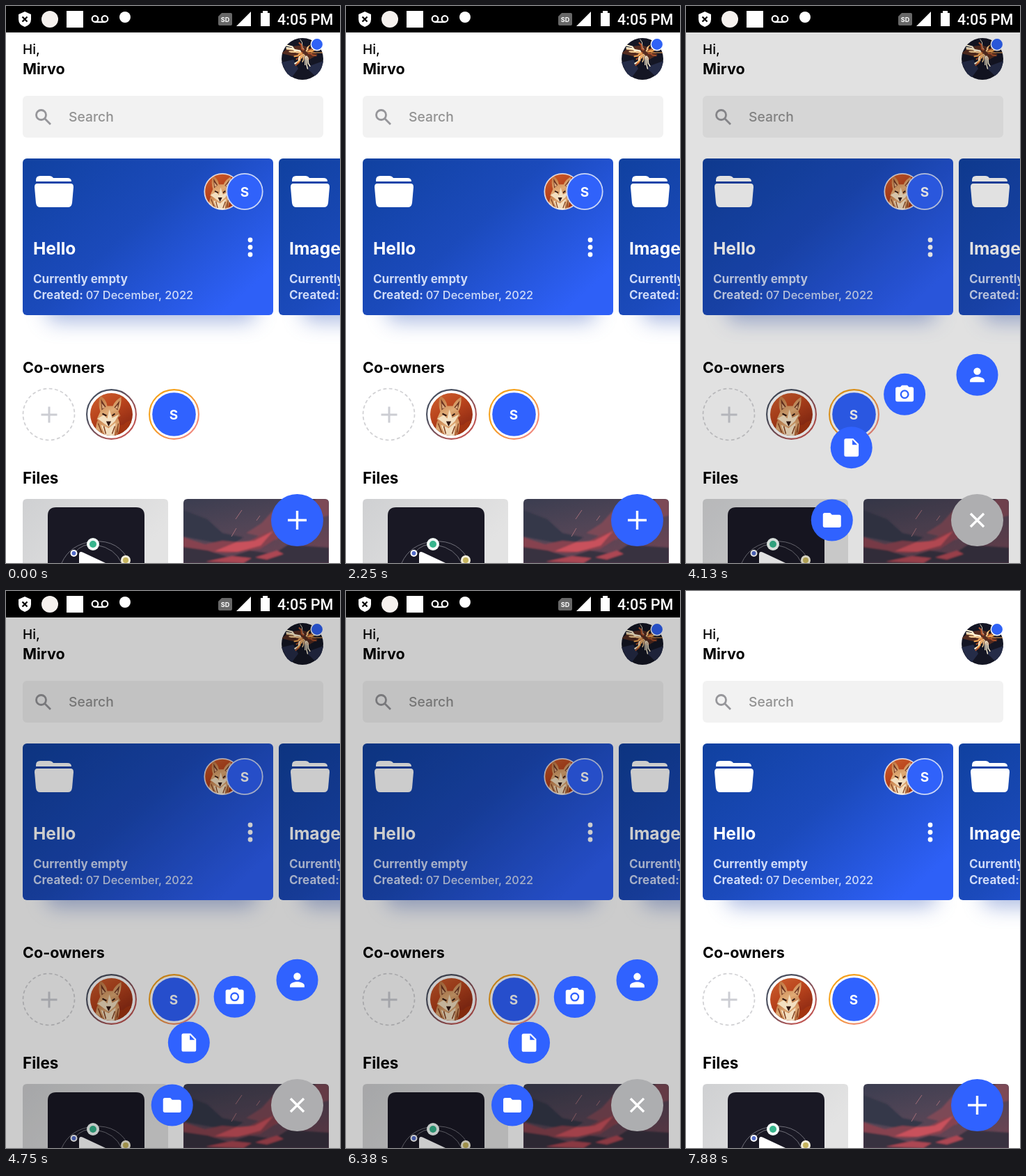
An HTML page that plays this animation: 480x800 px, repeating every 8 s.

```html
<!DOCTYPE html>
<html lang="en">
<head>
<meta charset="utf-8">
<title>File manager home</title>
<style>
  html, body { margin: 0; width: 100%; height: 100%; overflow: hidden; background: #fff; }
  svg { display: block; width: 480px; height: 800px; }
  text { font-family: Inter, sans-serif; font-weight: 700; }
  .regular { font-weight: 500; }
  .initial { font-size: 19px; fill: #fff; text-anchor: middle; }
  .stroke { fill: none; stroke: #fff; }
</style>
</head>
<body>
<svg viewBox="0 0 480 800">
  <defs>
    <linearGradient id="cardBlue" x2="1" y2=".7">
      <stop stop-color="#1041a0"/><stop offset=".5" stop-color="#1b4abb"/><stop offset="1" stop-color="#2e60f7"/>
    </linearGradient>
    <linearGradient id="foxRing" x2="1" y2="1"><stop offset=".3" stop-color="#4a5060"/><stop offset=".8" stop-color="#bd5552"/></linearGradient>
    <linearGradient id="goldRing" x2="1" y2="1"><stop offset=".4" stop-color="#f5a11c"/><stop offset=".85" stop-color="#f28b7c"/></linearGradient>
    <linearGradient id="rust" x2=".6" y2="1"><stop stop-color="#cf6230"/><stop offset=".5" stop-color="#b8431c"/><stop offset="1" stop-color="#8a2813"/></linearGradient>
    <linearGradient id="fur" x2=".3" y2="1"><stop stop-color="#bd6f3a"/><stop offset=".6" stop-color="#e0ab76"/><stop offset="1" stop-color="#b56a3a"/></linearGradient>
    <linearGradient id="paper" x2="1" y2=".4"><stop stop-color="#cfd0d2"/><stop offset="1" stop-color="#e3e3e3"/></linearGradient>
    <linearGradient id="sky" x2=".5" y2="1"><stop stop-color="#3b3d50"/><stop offset=".5" stop-color="#514556"/><stop offset="1" stop-color="#6a4453"/></linearGradient>
    <filter id="soft" x="-30%" y="-100%" width="160%" height="300%"><feGaussianBlur stdDeviation="15"/></filter>
    <filter id="haze"><feGaussianBlur stdDeviation="1.2"/></filter>
    <clipPath id="disc"><circle r="30.5"/></clipPath>
    <clipPath id="photo"><path d="M255 800V714q0-6 6-6h197q6 0 6 6v86z"/></clipPath>

    <g id="fox" clip-path="url(#disc)">
      <circle r="31" fill="url(#rust)"/>
      <path d="M5 31Q7 14 17 15 23 8 31 9V31z" fill="#a33512"/>
      <path d="M-21 31Q-25 14-17 4H9Q15 17 8 31z" fill="url(#fur)"/>
      <path d="M-16-27Q-7-21-6-12L2-12Q5-20 14-25 15-13 10-4L13 2 4 9-4 19-11 12-21 7-16-4Q-20-16-16-27z" fill="url(#fur)"/>
      <path d="M-15-22-8-11-14-6zM12-20 4-10 9-6z" fill="#6a3320"/>
      <path d="M-14-16-9-10-13-8zM9-14 5-9 9-8z" fill="#dba97d"/>
      <path d="M-20 6-11 1-6 6-3-7 1 5 11 0 5 10-4 18-12 12zM-15 15-4 20 6 12 4 31H-9z" fill="#f3dfc0"/>
      <path d="M-13-1l6 3M5-1 1 2M-6 11h4l-2 4z" stroke="#301812" stroke-width="2"/>
      <path d="M-19 13l5 13M-11 17l3 11M5 17 1 28M10 13 8 26" fill="none" stroke="#82401f" stroke-width="1.500"/>
    </g>

    <g id="card">
      <rect x="35" y="180" width="300" height="54" rx="10" fill="#5775c4" opacity=".5" filter="url(#soft)"/>
      <rect width="360" height="225" rx="6" fill="url(#cardBlue)"/>
      <g fill="#fff">
        <path d="M19 33v-2q0-6 6-6h13q4 0 6 3h20q6 0 6 5z"/>
        <path d="M21 36h48q4 0 4 5l-2 23q-1 6-6 6H25q-5 0-6-6L17 41q0-5 4-5z"/>
        <circle cx="327" cy="117" r="3.4"/><circle cx="327" cy="127.500" r="3.4"/><circle cx="327" cy="138" r="3.4"/>
      </g>
      <use href="#fox" transform="translate(287 47.500) scale(.85)"/>
      <circle class="stroke" cx="287" cy="47.500" r="25.700" stroke-width="1.800" stroke-opacity=".75"/>
      <circle cx="319" cy="47.500" r="25.700" fill="#3062fa" stroke="#ccd7f7" stroke-width="1.800"/>
      <text class="initial" x="319" y="54.500">S</text>
    </g>
  </defs>

  <rect width="480" height="800" fill="#fff"/>

  <text class="regular" x="24" y="69" font-size="19">Hi,</text>
  <text x="24" y="98" font-size="21.500">Mirvo</text>
  <g transform="translate(426 76)">
    <circle r="30" fill="#141624"/>
    <g clip-path="url(#disc)" fill="none">
      <path d="M-30-8Q-12-24 8-17L22-6 8 2-10-3z" fill="#552c20"/>
      <path d="M-30 5-13 1-6 14-18 30zM5 12 30 3 24 30z" fill="#252c48"/>
      <g id="sparks" stroke-linejoin="round"></g>
    </g>
    <circle cx="21" cy="-21" r="8.700" fill="#2f62f5" stroke="#fff" stroke-width="1.500"/>
  </g>

  <rect x="24" y="129" width="432" height="60" rx="6" fill="#f2f2f2"/>
  <g class="stroke" style="stroke:#96969a" stroke-width="2.800"><circle cx="50.500" cy="156.500" r="7"/><path d="M55.500 161.500 64 170"/></g>
  <text class="regular" x="90" y="166" font-size="19.300" fill="#929292">Search</text>

  <use href="#card" x="24" y="219"/>
  <use href="#card" x="392" y="219"/>
  <g id="labels"></g>

  <text x="24" y="527" font-size="21.600">Co-owners</text>
  <g fill="none">
    <circle cx="61.500" cy="586.500" r="37" stroke="#d0d0d3" stroke-width="1.700" stroke-dasharray="4.800 3.500"/>
    <path d="M50.500 587h23M62 575.500v23" stroke="#cccdd3" stroke-width="3"/>
    <circle cx="151.500" cy="586.500" r="35.400" stroke="url(#foxRing)" stroke-width="2.100"/>
    <circle cx="241.500" cy="586.500" r="35.400" stroke="url(#goldRing)" stroke-width="2.100"/>
  </g>
  <use href="#fox" x="151.500" y="586.500"/>
  <circle cx="241.500" cy="586.500" r="31.300" fill="#3062ff"/>
  <text class="initial" x="241" y="593.500">S</text>

  <text x="24" y="686" font-size="22.500">Files</text>
  <path d="M24 800V714q0-6 6-6h197q6 0 6 6v86z" fill="url(#paper)"/>
  <path d="M60 800V732q0-12 12-12h115q12 0 12 12v68z" fill="#191824"/>
  <g fill="none" stroke="#86868f" stroke-width=".8">
    <path d="M80 800Q92 773 125 769 163 766 178 800M98 786Q110 770 130 774 157 779 166 800"/>
  </g>
  <path d="M105 800V788q0-6 6-3l32 15z" fill="#fff"/>
  <circle cx="125" cy="773" r="9" fill="#f2fbf7"/><circle cx="125" cy="773" r="5" fill="#36b58c"/>
  <circle cx="97.500" cy="786" r="5" fill="#fff"/><circle cx="97.500" cy="786" r="3" fill="#526bc8"/>
  <circle cx="172" cy="796" r="7" fill="#f4f0dd"/><circle cx="172" cy="796" r="4" fill="#c6b45d"/>
  <g clip-path="url(#photo)">
    <rect x="255" y="708" width="209" height="92" fill="url(#sky)"/>
    <g filter="url(#haze)">
      <path d="M255 724l34 13 22 20 30 6-18 12-68-13z" fill="#363848"/>
      <path d="M345 757l22-14 21-23 28-12h48v24l-44 10-32 25z" fill="#7d4a57"/>
      <path d="M386 724l30-16h30l-19 13-32 15z" fill="#343544"/>
      <path d="M255 763l31 10 25-5 34 3 28-15 25 3-33 21-47 6-63-4z" fill="#87434f"/>
      <path d="M300 783l31-13 26-2 27-14-18 21-33 9z" fill="#c9515b"/>
      <path d="M255 777l35 5 31 10 29-10 35 5 20-13 59 4v22H255z" fill="#373241"/>
      <path d="M287 798l38-8 28 3-12 7zM358 792l31-10 10 5-24 8z" fill="#ac4653"/>
    </g>
    <path d="M339 724l-9 13M331 750l-7 12M365 732l-5 7" stroke="#a06d77"/>
  </g>

  <rect id="dim" y="38" width="480" height="762"/>

  <g id="status">
    <rect width="480" height="38"/>
    <path d="M27 8l9 4v7q0 8-9 11-9-3-9-11v-7z" fill="#fff"/>
    <path d="M23.500 15.500l7 7m0-7l-7 7" stroke="#000" stroke-width="2.200"/>
    <circle cx="63" cy="19" r="12" fill="#f6f1ee"/>
    <rect x="87" y="7" width="24" height="24" fill="#fff"/>
    <g class="stroke" stroke-width="2.200"><circle cx="128" cy="18.500" r="4.300"/><circle cx="142" cy="18.500" r="4.300"/><path d="M128 23h14"/></g>
    <circle cx="171" cy="16" r="8" fill="#fff"/>
    <path d="M305 15l5-5h13q2 0 2 2v14q0 2-2 2h-16q-2 0-2-2z" fill="#686868"/>
    <text x="315" y="23" font-size="9" text-anchor="middle" fill="#fff">SD</text>
    <path d="M331 29 352 8v21zM366 10h3V7h7v3h3v19h-13z" fill="#fff"/>
    <text x="390" y="27" font-size="21.500" fill="#fff" style="font-family:Roboto,sans-serif;font-weight:500">4:05 PM</text>
  </g>

  <g id="actions"></g>
  <g transform="translate(418.500 738.500)">
    <circle id="fab" r="37.500"/>
    <path id="plus" d="M-13.500 0h27M0-13.500v27" stroke="#fff" stroke-width="3.400"/>
  </g>
</svg>
<script>
const byId = id => document.getElementById(id);
const LOOP = 8000, OPEN = 3870, CLOSE = 6380, CUT = 7380;
const RADIUS = 179.5;

const cardLabels = (x, title) => `
  <text x="${x}" y="357" font-size="24.600" fill="#fff">${title}</text>
  <g font-size="17" fill="#cfdbf8">
    <text x="${x}" y="398">Currently empty</text>
    <text x="${x}" y="421">Created: <tspan class="regular" font-size="16.400">07 December, 2022</tspan></text>
  </g>`;
byId('labels').innerHTML = cardLabels(39, 'Hello') + cardLabels(407, 'Images');

// Jagged bright strokes flying out of one point of the profile picture.
let seed = 7;
const random = () => (seed = seed * 16807 % 2147483647) / 2147483647;
const sparkColors = ['#f2a653', '#fff3d6', '#b5552c', '#ffd79a'];
byId('sparks').innerHTML = Array.from({ length: 26 }, (_, i) => {
  const angle = random() * 2 * Math.PI, length = 8 + random() * 20;
  const x = length * Math.cos(angle), y = length * Math.sin(angle) * .7;
  return `<path d="M${4 + x * .3} ${-9 + y * .3}l${x * .4} ${y * .2}l${x * .1} ${y * .5}l${x * .5} ${y * .3}"
    stroke="${sparkColors[i % 4]}" stroke-width="${.8 + random() * 1.4}"/>`;
}).join('');

const icons = [
  'M10 4H4a2 2 0 0 0-2 2v12a2 2 0 0 0 2 2h16a2 2 0 0 0 2-2V8a2 2 0 0 0-2-2h-8z',
  'M6 2a2 2 0 0 0-2 2v16a2 2 0 0 0 2 2h12a2 2 0 0 0 2-2V8l-6-6zm7 7V3.5L18.5 9z',
  'M9 2 7.2 4H4a2 2 0 0 0-2 2v12a2 2 0 0 0 2 2h16a2 2 0 0 0 2-2V6a2 2 0 0 0-2-2h-3.200L15 2zM12 17a5 5 0 1 1 0-10 5 5 0 0 1 0 10zM12 8.800a3.200 3.200 0 1 0 0 6.400 3.200 3.200 0 0 0 0-6.400z',
  'M12 4a4 4 0 1 0 0 8 4 4 0 0 0 0-8zM12 14c-2.700 0-8 1.300-8 4v2h16v-2c0-2.700-5.300-4-8-4z'
];
byId('actions').innerHTML = icons.map(d => `<g>
  <circle r="30" fill="#3062ff"/>
  <path d="${d}" transform="scale(1.3) translate(-12 -12)" fill="#fff" fill-rule="evenodd"/></g>`).join('');
const buttons = [...byId('actions').children];

const ramp = (t, start, duration) => Math.min(1, Math.max(0, (t - start) / duration));

// Step response of a spring with damping ratio 0.5 and stiffness 200.
function spring(ms) {
  if (ms <= 0) return 0;
  const s = ms / 1000, w = Math.sqrt(200), wd = w * Math.sqrt(.75);
  return 1 - Math.exp(-w * s / 2) * (Math.cos(wd * s) + Math.sin(wd * s) / Math.sqrt(3));
}

function draw(t) {
  const reach = t < CLOSE ? spring(t - OPEN) : Math.max(0, 1 - spring(t - CLOSE));
  const turn = ramp(t, OPEN, 240) - ramp(t, CLOSE, 240);
  const mix = (a, b) => Math.round(a + (b - a) * turn);

  byId('actions').style.display = reach > 0 ? '' : 'none';
  buttons.forEach((button, i) => {
    const angle = i * Math.PI / 6, r = RADIUS * reach;
    button.setAttribute('transform', `translate(${418.5 - r * Math.cos(angle)} ${738.5 - r * Math.sin(angle)})`);
  });
  byId('fab').setAttribute('fill', `rgb(${mix(48, 174)},${mix(98, 174)},${mix(255, 176)})`);
  byId('plus').setAttribute('transform', `rotate(${45 * turn})`);
  byId('dim').setAttribute('opacity', t < CUT ? .2 * ramp(t, OPEN, 440) : 0);
  byId('status').style.display = t < CUT ? '' : 'none';
}

const begin = performance.now();
function tick() {
  draw((performance.now() - begin) % LOOP);
  requestAnimationFrame(tick);
}
tick();
</script>
</body>
</html>
```
